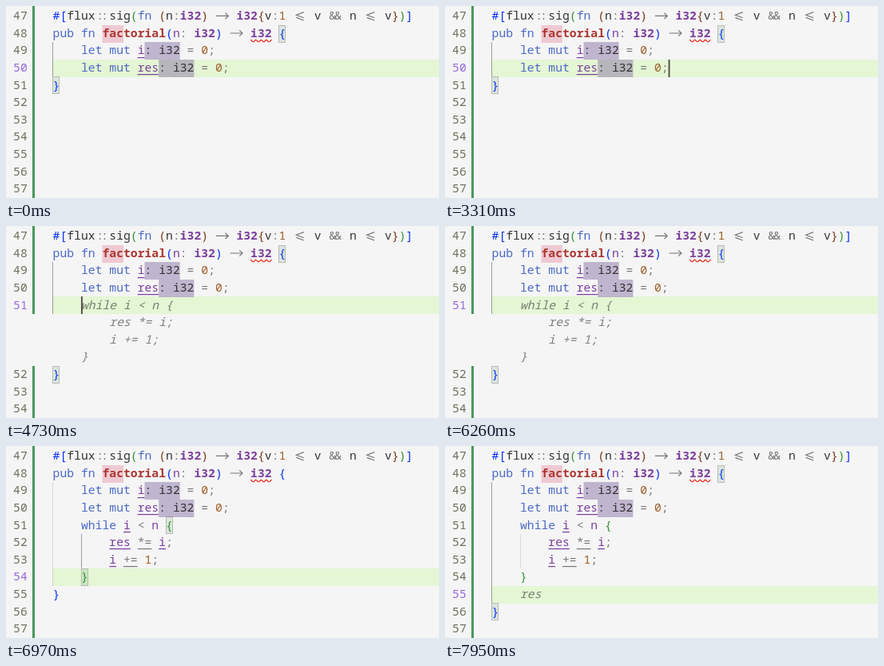
Write an HTML page with a canvas that moves like this. It is 542 px wide and 240 px high and loops after 8 s.

```html
<!DOCTYPE html>
<html lang="en">
<head>
<meta charset="utf-8">
<title>Code completion</title>
<style>
  html, body { margin: 0; width: 100%; height: 100%; overflow: hidden; background: #f5f5f5; }
  canvas { display: block; }
</style>
</head>
<body>
<canvas id="stage" width="542" height="240"></canvas>
<script>
const ctx = document.getElementById('stage').getContext('2d');

const LOOP = 8000;
const FONT_SIZE = 14.73;
const CHAR = 8.84;
const LEFT = 58.6;
const ROW_HEIGHT = 22;
const FAMILY = '"Noto Sans Mono", "DejaVu Sans Mono", monospace';

const colX = col => LEFT + col * CHAR;
const rowTop = row => Math.round(2.2 + row * 21.55);
const baseline = row => 17.2 + row * 21.6;

const STYLES = {
  text: { color: '#333333' },
  key: { color: '#4b69c6' },
  op: { color: '#777777' },
  opMut: { color: '#777777', underline: true },
  num: { color: '#9c5d27' },
  name: { color: '#7a3e9d' },
  mut: { color: '#7a3e9d', underline: true },
  type: { color: '#7a3e9d', weight: 'bold' },
  wrong: { color: '#7a3e9d', weight: 'bold', squiggle: true },
  fn: { color: '#aa3731', weight: 'bold' },
  hint: { color: '#333333', back: 'rgba(112,86,151,.4)' },
  b0: { color: '#0431fa' },
  b1: { color: '#319331' },
  b2: { color: '#7b3814' },
  ghost: { color: 'rgba(0,0,0,.48)', slant: 'italic' }
};

// A line is a flat list of style, text, style, text...
const ATTRIBUTE = ['b0', '#[', 'text', 'flux', 'op', '::', 'text', 'sig', 'b1', '(', 'key', 'fn', 'b2', ' (',
  'text', 'n', 'op', ':', 'type', 'i32', 'b2', ')', 'text', ' ', 'op', '->', 'text', ' ', 'type', 'i32',
  'b2', '{', 'text', 'v', 'op', ':', 'num', '1', 'text', ' ', 'op', '<=', 'text', ' v ', 'op', '&&',
  'text', ' n ', 'op', '<=', 'text', ' v', 'b2', '}', 'b1', ')', 'b0', ']'];
const SIGNATURE = ['key', 'pub fn ', 'fn', 'factorial', 'b0', '(', 'name', 'n', 'op', ': ', 'type', 'i32',
  'b0', ')', 'text', ' ', 'op', '->', 'text', ' ', 'wrong', 'i32', 'b0', ' {'];
const declare = name => ['key', '    let mut ', 'mut', name, 'hint', ': i32', 'op', ' = ', 'num', '0', 'op', ';'];
const HEAD = [ATTRIBUTE, SIGNATURE, declare('i'), declare('res')];
const CLOSE = ['b0', '}'];
const BLANK = [];

const loopLines = (name, op) => [
  ['key', '    while ', name, 'i', 'op', ' < ', 'name', 'n', 'b1', ' {'],
  ['text', '        ', name, 'res', 'text', ' ', op, '*=', 'text', ' ', name, 'i', 'op', ';'],
  ['text', '        ', name, 'i', 'text', ' ', op, '+=', 'text', ' ', 'num', '1', 'op', ';'],
  ['b1', '    }']
];
const GHOST_LOOP = ['    while i < n {', '        res *= i;', '        i += 1;', '    }'].map(s => ['ghost', s]);
const LOOP_RAW = loopLines('name', 'op');
const LOOP_MARKED = loopLines('mut', 'opMut');

// guides: [column, first row, last row, active]; boxes: [column, row]; cursor: [column, row]
const outerBoxes = row => [[32, 1], [0, row]];
const accepted = body => ({
  lines: [...HEAD, ...body, CLOSE], active: 7, cursor: [5, 7],
  boxes: [[16, 4], [4, 7]], guides: [[0, 2, 7, false], [4, 5, 6, true]]
});
const returning = line => ({
  lines: [...HEAD, ...LOOP_MARKED, line, CLOSE], active: 8, cursor: [4, 8],
  boxes: outerBoxes(9), guides: [[0, 2, 8, true], [4, 5, 6, false]]
});

const SCENES = [
  { at: 0, lines: [...HEAD, CLOSE], active: 3, cursor: [25, 3], boxes: outerBoxes(4), guides: [[0, 2, 3, true]] },
  { at: 3840, lines: [...HEAD, BLANK, CLOSE], active: 4, cursor: [4, 4], boxes: outerBoxes(5), guides: [[0, 2, 4, true]] },
  { at: 3930, lines: [...HEAD, ...GHOST_LOOP, CLOSE], active: 4, cursor: [4, 4], boxes: outerBoxes(8),
    guides: [[0, 2, 4, true]], virtual: [5, 7] },
  { at: 6520, ...accepted(LOOP_RAW) },
  { at: 6610, ...accepted(LOOP_MARKED) },
  { at: 7410, ...returning(BLANK) },
  { at: 7770, ...returning(['ghost', '    res']) }
];

// The cursor starts hidden and flips at each of these times.
const BLINKS = [360, 800, 1340, 1870, 2320, 2860, 3310, 4280, 4730, 5270, 5720, 6260, 6520, 6970, 7410, 7950];

function fill(color, x, y, w, h) {
  ctx.fillStyle = color;
  ctx.fillRect(x, y, w, h);
}

function polyline(color, width, ...paths) {
  ctx.strokeStyle = color;
  ctx.lineWidth = width;
  ctx.beginPath();
  for (const path of paths) {
    path.forEach(([x, y], i) => i ? ctx.lineTo(x, y) : ctx.moveTo(x, y));
  }
  ctx.stroke();
}

const LIGATURES = {
  '->': (x, y, color) => polyline(color, 1.2,
    [[x + 1, y - 4.8], [x + 16.4, y - 4.8]],
    [[x + 12.6, y - 8.4], [x + 16.4, y - 4.8], [x + 12.6, y - 1.2]]),
  '<=': (x, y, color) => polyline(color, 1.2,
    [[x + 13.6, y - 9.6], [x + 4.2, y - 6], [x + 13.6, y - 2.4]],
    [[x + 4.2, y - 2.8], [x + 13.6, y + 0.8]]),
  '&&': (x, y, color) => pair('&', x, y, color, 0.9),
  '::': (x, y, color) => pair(':', x, y, color, 1.6)
};

function pair(glyph, x, y, color, inset) {
  ctx.fillStyle = color;
  ctx.fillText(glyph, x + inset, y);
  ctx.fillText(glyph, x + CHAR - inset, y);
}

function squiggle(x, y, width) {
  const points = [];
  for (let dx = 0; dx <= width; dx += 0.5) {
    points.push([x + dx, y - Math.cos(dx * Math.PI / 3.3) * 1.2]);
  }
  polyline('#e51400', 1.1, points);
}

function drawText(text, x, y, style) {
  ctx.font = `${style.slant || 'normal'} ${style.weight || 'normal'} ${FONT_SIZE}px ${FAMILY}`;
  if (LIGATURES[text]) return LIGATURES[text](x, y, style.color);
  ctx.fillStyle = style.color;
  [...text].forEach((ch, i) => ch !== ' ' && ctx.fillText(ch, x + i * CHAR, y));
}

function drawLine(line, row) {
  const y = baseline(row);
  let col = 0;
  for (let i = 0; i < line.length; i += 2) {
    const style = STYLES[line[i]], text = line[i + 1];
    const x = colX(col), width = text.length * CHAR;
    if (style.back) fill(style.back, x, rowTop(row), width, ROW_HEIGHT);
    drawText(text, x, y, style);
    if (style.underline) fill(style.color, x, Math.round(y + 3.2), width, 1.2);
    if (style.squiggle) squiggle(x, y + 4.8, width);
    col += text.length;
  }
}

function drawGutter({ virtual = [99, 98], active }) {
  const [first, last] = virtual;
  let number = 47;
  for (let row = 0; row < 11; row++) {
    if (row >= first && row <= last) continue;
    drawText(String(number++), 9.1, baseline(row), { color: row === active ? '#9769dc' : '#6d705b' });
  }
  fill('#48985d', 33, 0, 3, 240);
  if (last >= first) fill('#f5f5f5', 33, rowTop(first), 3, rowTop(last + 1) - rowTop(first));
}

function drawBox([col, row]) {
  const x = Math.round(colX(col) - 0.3), y = rowTop(row);
  fill('rgba(0,100,0,.1)', x, y, 9, ROW_HEIGHT);
  ctx.strokeStyle = '#b9b9b9';
  ctx.lineWidth = 1;
  ctx.strokeRect(x + 0.5, y + 0.5, 8, ROW_HEIGHT - 1);
}

function drawGuide([col, first, last, active]) {
  const y = rowTop(first);
  fill(active ? '#777777b0' : '#aaaaaa60', Math.round(colX(col) - 0.3), y, 1, rowTop(last + 1) - y);
}

function draw(time) {
  const scene = SCENES.filter(s => s.at <= time).pop();
  fill('#f5f5f5', 0, 0, 542, 240);
  fill('#e4f6d4', 58, rowTop(scene.active), 484, ROW_HEIGHT);
  fill('#efc9d2', colX(7), rowTop(1), 3 * CHAR, ROW_HEIGHT);
  scene.guides.forEach(drawGuide);
  scene.boxes.forEach(drawBox);
  drawGutter(scene);
  scene.lines.forEach(drawLine);
  if (BLINKS.filter(t => t <= time).length % 2) {
    const [col, row] = scene.cursor;
    fill('#54494b', colX(col), rowTop(row), 1.9, ROW_HEIGHT);
  }
}

function tick(now) {
  draw(now % LOOP);
  requestAnimationFrame(tick);
}
draw(0);
requestAnimationFrame(tick);
</script>
</body>
</html>
```
